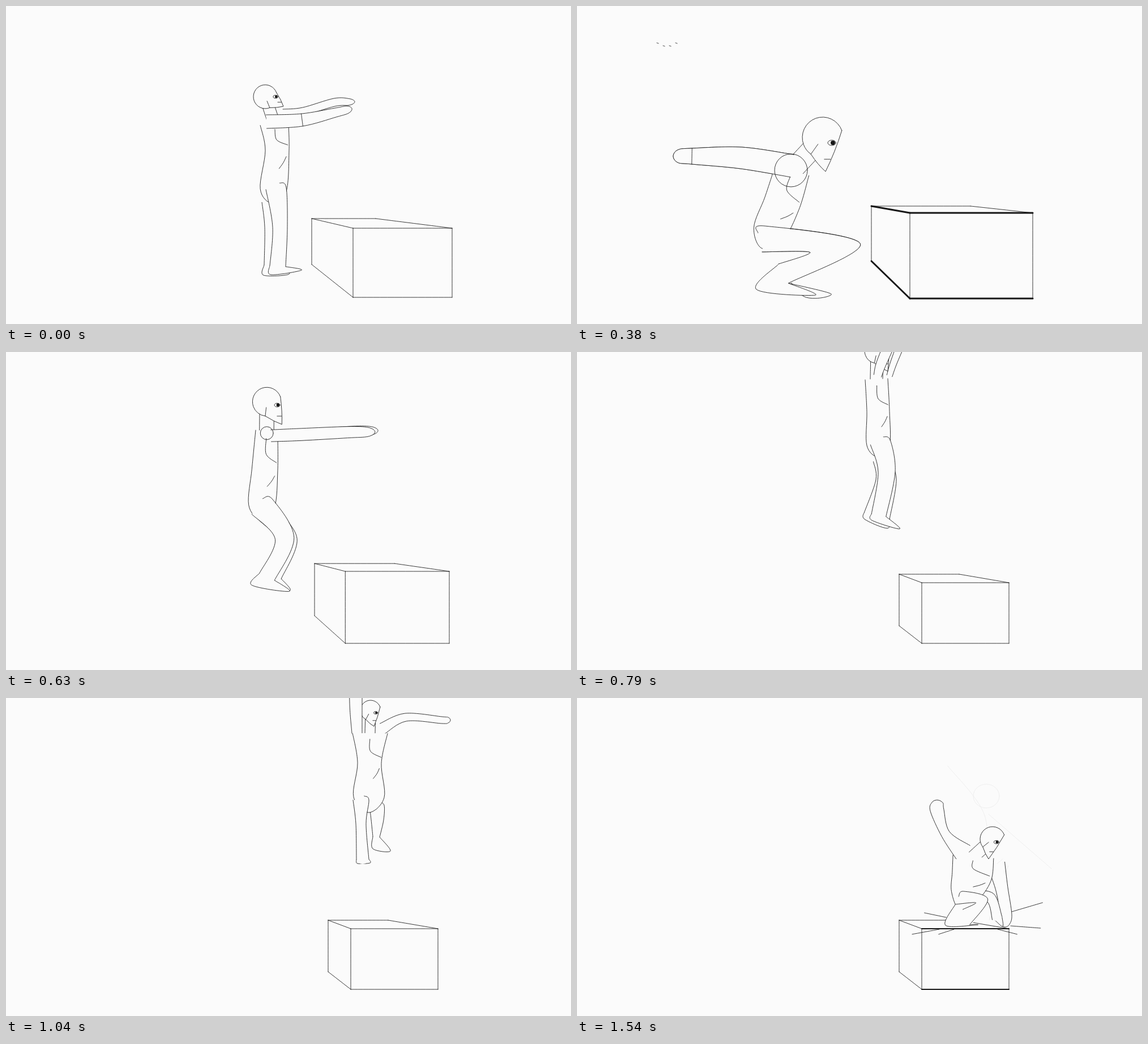
An HTML page with a canvas that plays this animation: 998 by 561 pixels, repeating every 2120 ms.

```html
<!DOCTYPE html>
<html lang="en">
<head>
<meta charset="utf-8">
<title>Box jump</title>
<style>
html, body { margin: 0; width: 100%; height: 100%; overflow: hidden; background: #fbfbfb; }
canvas { display: block; width: 998px; height: 561px; }
</style>
</head>
<body>
<canvas id="stage" width="998" height="561"></canvas>
<script>
const PAPER = '#fbfbfb', INK = '#161616', FAINT = '#ececec', THIN = .85;
const LOOP = 2120, FPS = 24;
const ctx = document.getElementById('stage').getContext('2d');

// Joints are [x, y, half width]; arms end in a fingertip, feet are heel and toe,
// heads are [x, y, radius, chin x, chin y].
// Boxes are front left, top, right, bottom, then back left, top, bottom, top right.
const landing = [609, 407, 763, 514, 569, 392, 483, 675];
const poses = [
  { at: 0, box: [613, 392, 788, 514, 540, 375, 456, 653], cuff: 1,
    head: [458, 160, 21, 490, 177],
    torso: [[474, 208, 25], [479, 255, 21], [472, 325, 23]],
    arm: [[460, 204, 12], [523, 201, 11], [582, 188, 8], [611, 181, 0]],
    arm2: [[490, 190, 8], [525, 186, 7], [580, 170, 7], [616, 169, 0]],
    leg: [[477, 322, 18], [484, 390, 13], [480, 459, 14]], foot: [[468, 474], [522, 466]],
    leg2: [[465, 345, 13], [470, 390, 13], [470, 457, 14]], foot2: [[455, 475], [500, 473]] },
  { at: 9, box: [588, 365, 805, 516, 520, 353, 450, 695], heavy: [3, 3], cuff: 2, crumbs: true,
    head: [434, 232, 36, 439, 292], ball: [378, 290, 29],
    torso: [[380, 290, 31], [362, 348, 32], [338, 402, 28]],
    arm: [[380, 282, 20], [290, 268, 19], [203, 265, 14], [170, 265, 0]],
    leg: [[330, 411, 23], [456, 427, 45], [365, 472, 19]], foot: [[317, 500], [421, 510]],
    foot2: [[400, 512], [449, 508]] },
  { at: 12, box: [592, 372, 798, 514, 527, 359, 452, 695],
    head: [409, 155, 28, 441, 198], ball: [408, 219, 20],
    torso: [[409, 207, 19], [401, 285, 25], [391, 352, 25]],
    arm: [[421, 227, 13], [467, 282, 12], [528, 337, 10], [553, 349, 0]],
    leg: [[390, 358, 26], [451, 417, 18], [407, 478, 16]], foot: [[369, 497], [448, 505]],
    leg2: [[400, 355, 20], [460, 412, 17], [428, 474, 10]], foot2: [[425, 503], [467, 503]] },
  { at: 19, box: landing, lift: 25,
    head: [530, -2, 22, 549, 34],
    torso: [[529, 48, 20], [532, 105, 20], [532, 165, 20]],
    arm: [[531, 42, 7], [540, 14, 9], [574, -60, 10], [620, -125, 0]],
    arm2: [[552, 42, 5], [562, 12, 6], [592, -60, 8], [632, -120, 0]],
    leg: [[536, 160, 18], [547, 212, 15], [533, 288, 13]], foot: [[521, 297], [570, 312]],
    leg2: [[537, 190, 14], [546, 225, 18], [530, 288, 23]], foot2: [[508, 295], [548, 311]] },
  { at: 25, box: landing,
    head: [644, 22, 18, 650, 50],
    torso: [[643, 62, 31], [642, 115, 21], [641, 175, 27]],
    arm: [[620, 62, 9], [618, 10, 11], [618, -60, 11], [617, -92, 0]],
    arm2: [[665, 54, 10], [706, 34, 7], [770, 39, 6], [785, 39, 0]],
    leg: [[627, 180, 14], [627, 222, 9], [630, 285, 11]], foot: [[621, 292], [643, 291]],
    leg2: [[655, 190, 13], [656, 215, 11], [654, 245, 6]], foot2: [[648, 266], [679, 270]] },
  { at: 28, box: landing, ghost: true,
    head: [687, 158, 24, 687, 197],
    torso: [[672, 215, 31], [669, 265, 26], [665, 298, 26]],
    arm: [[651, 205, 9], [650, 140, 12], [652, 80, 11], [653, 56, 0]],
    arm2: [[700, 205, 20], [733, 240, 10], [770, 277, 9], [778, 302, 0]],
    leg: [[670, 305, 16], [668, 340, 13], [653, 390, 11]], foot: [[645, 397], [668, 403]],
    leg2: [[690, 317, 17], [716, 332, 13], [682, 385, 14]], foot2: [[668, 396], [721, 402]] },
  { at: 31, box: landing, heavy: [2, THIN], ghost: true, impact: true,
    head: [734, 249, 22, 727, 284],
    torso: [[700, 280, 36], [697, 315, 35], [684, 350, 24]],
    arm: [[682, 272, 17], [651, 240, 8], [636, 198, 12], [637, 180, 0]],
    arm2: [[740, 293, 16], [750, 335, 11], [758, 382, 10], [755, 404, 0]],
    leg: [[682, 357, 16], [715, 358, 11], [681, 382, 22]], foot: [[651, 401], [707, 400]],
    leg2: [[695, 349, 9], [730, 352, 9], [742, 388, 9]], foot2: [[738, 392], [752, 403]] }
];
// A hidden far limb lies behind the near one
for (const p of poses) {
  p.arm2 ??= p.arm;
  p.leg2 ??= p.leg;
  p.ball ??= [p.arm[0][0], p.arm[0][1], 0];
}

const mix = (a, b, u) => Array.isArray(a) ? a.map((v, i) => mix(v, b[i], u)) : a + (b - a) * u;
const add = (p, d, k) => [p[0] + d[0] * k, p[1] + d[1] * k];
const unit = ([x, y]) => { const l = Math.hypot(x, y) || 1; return [x / l, y / l]; };
const toward = (p, q) => unit([q[0] - p[0], q[1] - p[1]]);
const polar = (c, r, a) => [c[0] + r * Math.cos(a), c[1] + r * Math.sin(a)];

// Arms swing around the shoulder the short way
function swing(p, q, u) {
  const root = mix(p[0], q[0], u);
  return p.map((a, i) => {
    const b = q[i], [dp, dq] = [[a, p[0]], [b, q[0]]].map(([e, s]) => [e[0] - s[0], e[1] - s[1]]);
    const from = Math.atan2(dp[1], dp[0]), gap = Math.atan2(dq[1], dq[0]) - from;
    const turn = Math.atan2(Math.sin(gap), Math.cos(gap));
    return [...polar(root, mix(Math.hypot(...dp), Math.hypot(...dq), u), from + turn * u), mix(a[2], b[2], u)];
  });
}

function poseAt(a, b, u) {
  if (!u) return a;
  const out = {};
  for (const k of ['box', 'head', 'ball', 'torso', 'leg', 'leg2', 'foot', 'foot2']) out[k] = mix(a[k], b[k], u);
  for (const k of ['arm', 'arm2']) out[k] = swing(a[k], b[k], u);
  return out;
}

// Smooth line through the points
function trace(p) {
  ctx.beginPath();
  ctx.moveTo(p[0][0], p[0][1]);
  for (let i = 0; i < p.length - 1; i++) {
    const a = p[i - 1] || p[i], b = p[i], c = p[i + 1], d = p[i + 2] || c;
    ctx.bezierCurveTo(b[0] + (c[0] - a[0]) / 6, b[1] + (c[1] - a[1]) / 6,
      c[0] - (d[0] - b[0]) / 6, c[1] - (d[1] - b[1]) / 6, c[0], c[1]);
  }
}
function line(p, color = INK, width = THIN) {
  trace(p);
  ctx.strokeStyle = color;
  ctx.lineWidth = width;
  ctx.stroke();
}
function shape(p, color = PAPER) {
  trace(p);
  ctx.fillStyle = color;
  ctx.fill();
}
function ring(x, y, rx, ry = rx, color = INK) {
  ctx.beginPath();
  ctx.ellipse(x, y, rx, ry, 0, 0, 2 * Math.PI);
  ctx.strokeStyle = color;
  ctx.lineWidth = THIN;
  ctx.stroke();
}

// Front and back outlines of a chain of joints
function sides(j) {
  const axis = j.map((p, i) => {
    const a = i ? toward(j[i - 1], p) : [0, 0], b = j[i + 1] ? toward(p, j[i + 1]) : [0, 0];
    return unit([a[0] + b[0], a[1] + b[1]]);
  });
  const edge = s => j.map((p, i) => add(p, [axis[i][1], -axis[i][0]], s * p[2]));
  return { front: edge(1), back: edge(-1), axis };
}

function capped(j, tip) {
  const { front, back } = sides(j), p = [...front, tip, ...back.reverse()];
  shape(p);
  line(p);
}

function drawArm(j, cuff) {
  const knuckle = mix(j[2], j[3], .75);
  knuckle[2] = j[2][2] * .8;
  const chain = [...j.slice(0, 3), knuckle];
  capped(chain, j[3]);
  if (cuff) {
    const { front, back } = sides(chain);
    line([front[cuff], back[cuff]]);
  }
}

function drawLeg(j, foot) {
  const { front, back, axis } = sides(j), end = j.length - 1;
  const sole = [back[end], ...foot, front[end]];
  shape(sole);
  line(sole);
  shape([...front, ...[...back].reverse()]);
  const crease = add(mix(j[0].slice(0, 2), front[0], .4), axis[0], -j[0][2] / 2);
  line([crease, ...front]);
  line(back);
}

function drawTorso(j) {
  const { front, axis } = sides(j), hip = j[2];
  capped(j, add(hip, axis[2], hip[2]));
  const at = (s, t) => {
    const i = Math.min(Math.floor(s), 1);
    return mix(mix(j[i], j[i + 1], s - i).slice(0, 2), mix(front[i], front[i + 1], s - i), t);
  };
  line([at(.2, 0), at(.6, .05), at(.8, .9)]);
  line([at(1.45, .3), at(1.3, .6), at(1.15, .8)]);
}

function drawHead([x, y, r, cx, cy]) {
  const c = [x, y], chin = [cx, cy], brow = polar(c, r, -.35);
  const jawAngle = Math.atan2(cy - y, cx - x) + .7, jaw = polar(c, r, jawAngle);
  const bulge = (p, q) => add(mix(p, q, .5), toward(c, mix(p, q, .5)), r * .1);
  ctx.beginPath();
  ctx.arc(x, y, r, -.35, jawAngle, true);
  ctx.quadraticCurveTo(...bulge(jaw, chin), cx, cy);
  ctx.quadraticCurveTo(...bulge(chin, brow), ...brow);
  ctx.fillStyle = PAPER;
  ctx.fill();
  ctx.strokeStyle = INK;
  ctx.lineWidth = THIN;
  ctx.stroke();
  line([mix(c, jaw, .4), jaw]);
  const eye = add(mix(brow, chin, .3), [-1, 0], r * .25), lip = mix(brow, chin, .7);
  ring(...eye, r * .2, r * .13);
  ctx.beginPath();
  ctx.arc(eye[0] + r * .05, eye[1], r * .11, 0, 2 * Math.PI);
  ctx.fillStyle = INK;
  ctx.fill();
  line([lip, add(lip, [-1, 0], r * .3)]);
}

function drawBox([l, t, r, b, bl, bt, bb, br], [level, slant] = [THIN, THIN]) {
  line([[l, t], [r, t]], INK, level);
  line([[l, b], [r, b]], INK, level);
  line([[bl, bt], [l, t]], INK, slant);
  line([[bl, bb], [l, b]], INK, slant);
  line([[bl, bt], [br, bt]]);
  line([[br, bt], [r, t]]);
  for (const [x, y, end] of [[bl, bt, bb], [l, t, b], [r, t, b]]) line([[x, y], [x, end]]);
}

function drawGhost() {
  ring(723, 173, 23, 21, FAINT);
  line([[655, 120], [720, 207], [720, 310]], FAINT);
  line([[727, 205], [838, 301]], FAINT);
  line([[762, 296], [728, 392]], FAINT);
  line([[692, 405], [728, 312], [752, 284]], FAINT);
}

function drawImpact() {
  const rays = [[-48, -10], [-60, 11], [-34, 11], [43, 11], [68, -20], [66, 5]];
  for (const d of rays) line([add([700, 397], d, 1), add([700, 397], d, 1.8)]);
}

function drawCrumbs() {
  for (let i = 0; i < 4; i++) {
    const x = 141 + 11 * i, y = i % 3 ? 70 : 65;
    line([[x, y], [x + 3, y + 1]]);
  }
}

function draw(n) {
  const i = poses.findLastIndex(p => p.at <= n), a = poses[i], b = poses[i + 1] || a;
  const u = i && b !== a ? (n - a.at) / (b.at - a.at) : 0;
  const near = u < .5 ? a : b, held = u ? {} : a, p = poseAt(a, b, u);

  ctx.fillStyle = PAPER;
  ctx.fillRect(0, 0, 998, 561);
  if (near.ghost) drawGhost();
  drawBox(p.box, held.heavy);
  if (held.crumbs) drawCrumbs();
  if (held.impact) drawImpact();

  ctx.save();
  ctx.translate(0, -(a.lift || 0) * Math.sin(Math.PI * u));
  drawArm(p.arm2);
  drawLeg(p.leg2, p.foot2);
  const [x, y, r] = p.head, { front, back } = sides([[x, y, r / 2], [...p.torso[0].slice(0, 2), r / 2]]);
  line(front);
  line(back);
  drawTorso(p.torso);
  drawLeg(p.leg, p.foot);
  drawHead(p.head);
  drawArm(p.arm, held.cuff);
  if (p.ball[2] > 2) ring(...p.ball);
  ctx.restore();
}

ctx.lineCap = ctx.lineJoin = 'round';
const start = performance.now();
function tick() {
  const t = (performance.now() - start) % LOOP;
  draw(Math.floor((t + 2) * FPS / 1000));
  requestAnimationFrame(tick);
}
tick();
</script>
</body>
</html>
```
